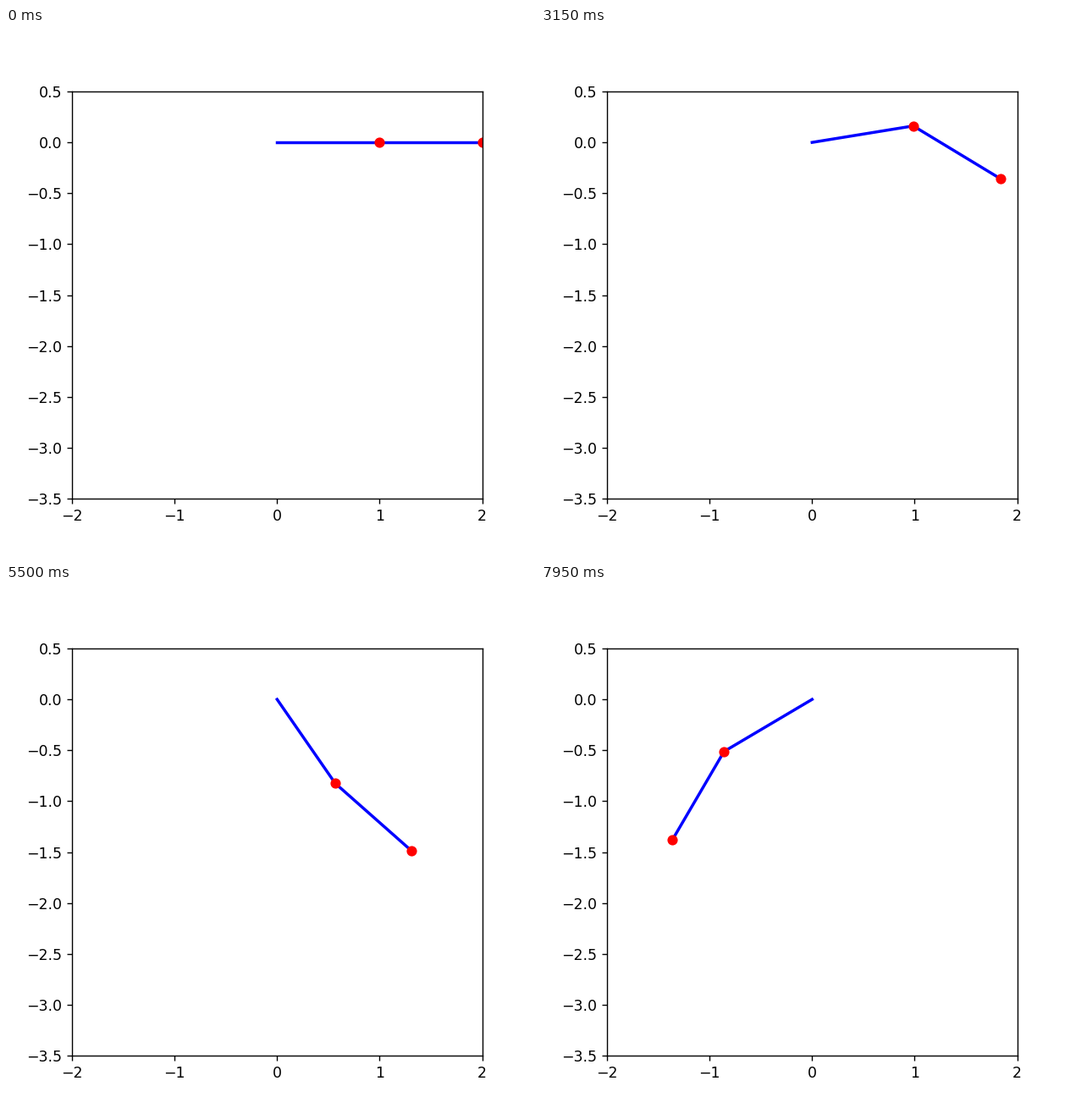
A matplotlib script for the animation above (8 s loop, 625 px wide and 625 px high).

```python
import numpy as np
import matplotlib.pyplot as plt
from matplotlib.animation import FuncAnimation

G = 9.81
DT = 0.05
FRAMES = 160
SUBSTEPS = 20


def deriv(s):
    """Equal masses and rods of length 1; angles measured from straight down."""
    a, b, u, v = s
    d = a - b
    sin, cos = np.sin(d), np.cos(d)
    den = 2 - cos * cos
    du = (-2 * G * np.sin(a) + G * np.sin(b) * cos
          - sin * (v * v + u * u * cos)) / den
    dv = (2 * G * np.sin(a) * cos - 2 * G * np.sin(b)
          + sin * (2 * u * u + v * v * cos)) / den
    return np.array([u, v, du, dv])


def rk4(s, h):
    k1 = deriv(s)
    k2 = deriv(s + h / 2 * k1)
    k3 = deriv(s + h / 2 * k2)
    k4 = deriv(s + h * k3)
    return s + h / 6 * (k1 + 2 * k2 + 2 * k3 + k4)


def simulate():
    s = np.array([np.pi / 2, np.pi / 2, 0.0, 0.0])
    angles = []
    for _ in range(FRAMES):
        angles.append(s[:2])
        for _ in range(SUBSTEPS):
            s = rk4(s, DT / SUBSTEPS)
    return np.array(angles)


angles = simulate()
xs = np.cumsum(np.sin(angles), axis=1)
ys = np.cumsum(-np.cos(angles), axis=1)

fig, ax = plt.subplots(figsize=(5, 5), dpi=125)
ax.set_xlim(-2, 2)
ax.set_ylim(-3.5, 0.5)
ax.set_xticks(range(-2, 3))
rods, = ax.plot([], [], "b-", lw=2)
bobs, = ax.plot([], [], "ro")


def update(i):
    rods.set_data([0, *xs[i]], [0, *ys[i]])
    bobs.set_data(xs[i], ys[i])
    return rods, bobs


anim = FuncAnimation(fig, update, frames=FRAMES, interval=50,
                     repeat=True, repeat_delay=0)
plt.show()
```
